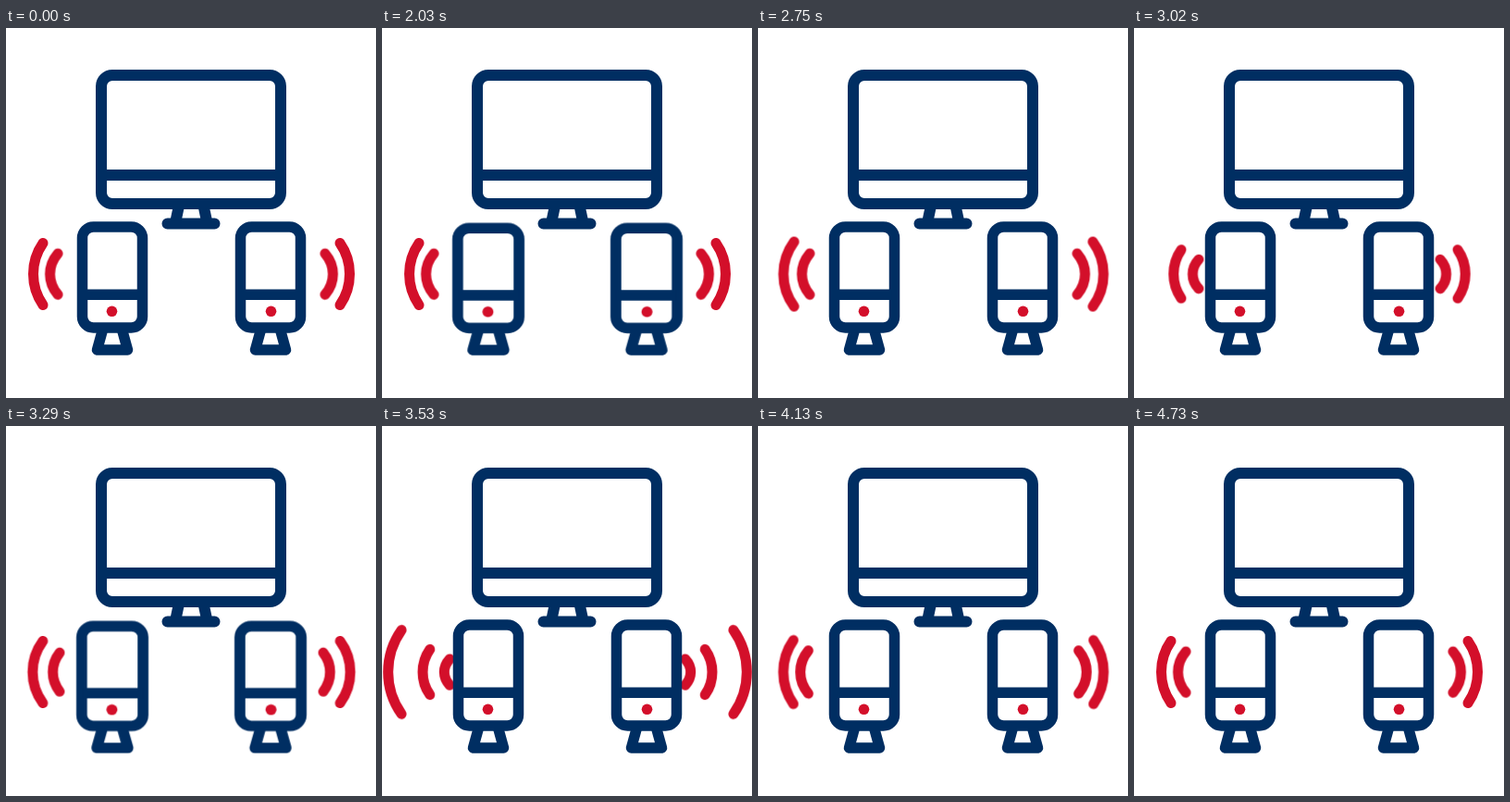
These frames come from a looping animation (400x400 px, 4.76 s). An HTML page without scripts:

```html
<!DOCTYPE html>
<html lang="en">
<head>
<meta charset="utf-8">
<title>Connected devices</title>
<style>
  html, body { margin: 0; width: 100%; height: 100%; overflow: hidden; background: #fff; }
  svg { display: block; width: 100%; height: 100%; }

  /* poses of one wave, from behind the phone to off stage */
  :root {
    --hidden: translateX(97px) scale(.1, .1);
    --born: translateX(70px) scale(.62, .465);
    --waiting: translateX(69.8px) scale(.62, .478);
    --near-inner: translateX(58px) scale(.7, .627);
    --inner: translateX(56px) scale(.81, .663);
    --leaving-inner: translateX(50px) scale(.71, .76);
    --between: translateX(52px) scale(.857, .806);
    --near-outer: translateX(39.8px) scale(1.05, 1);
    --outer: translateX(40px) scale(1, 1);
    --past-outer: translateX(39px) scale(1.1, 1.045);
    --edge: translateX(8px) scale(1.58, 1.58);
    --gone: translateX(-12px) scale(1.9, 1.9);
  }

  .line { fill: none; stroke: #002e62; stroke-width: 12; stroke-linecap: round; stroke-linejoin: round; }
  .phone { stroke-width: 11.5; }
  .body { fill: #fff; }
  .bar { stroke-linecap: butt; }
  .dot { fill: #d30f2a; stroke: none; }
  .wave {
    d: path("M0 -33.5A58.7 58.7 0 0 0 0 33.5");
    fill: none; stroke: #d30f2a; stroke-width: 11; stroke-linecap: round;
    vector-effect: non-scaling-stroke;
  }
  .wave, .phone { animation: 4760ms linear infinite; }
  .phone { transform-origin: 115px 354px; animation-name: squash; }
  .a { animation-name: a; }
  .b { animation-name: b; }
  .c { animation-name: c; }
  .d { animation-name: d; }
  .e { animation-name: e; }

  /* pulses start at 42.65%, 55.88% and 69.12% */
  @keyframes squash {
    0%, 42.6%, 44.2%, 54.6%, 57.2%, 67.9%, 70.4%, 100% { transform: none; }
    42.65%, 43.2%, 55.88%, 69.12% { transform: scale(1.02, .99); }
  }
  @keyframes a {
    0%, 42.65% { transform: var(--outer); }
    44.54% { transform: var(--past-outer); animation-timing-function: ease-in; }
    48.95% { transform: var(--edge); }
    49.58%, 100% { transform: var(--gone); }
  }
  @keyframes b {
    0%, 44.54% { transform: var(--inner); }
    48.95% { transform: var(--leaving-inner); }
    51.47% { transform: var(--between); }
    55.88% { transform: var(--near-outer); }
    57.77% { transform: var(--past-outer); animation-timing-function: ease-in; }
    62.18% { transform: var(--edge); }
    62.82%, 100% { transform: var(--gone); }
  }
  @keyframes c {
    0%, 44.54% { transform: var(--hidden); animation-timing-function: ease-out; }
    48.95% { transform: var(--born); }
    51.47% { transform: var(--waiting); }
    55.88% { transform: var(--near-inner); }
    57.77% { transform: var(--inner); }
    62.18% { transform: var(--leaving-inner); }
    64.71% { transform: var(--between); }
    69.12% { transform: var(--near-outer); }
    71.01% { transform: var(--past-outer); animation-timing-function: ease-in; }
    75.42% { transform: var(--edge); }
    76.05%, 100% { transform: var(--gone); }
  }
  @keyframes d {
    0%, 57.77% { transform: var(--hidden); animation-timing-function: ease-out; }
    62.18% { transform: var(--born); }
    64.71% { transform: var(--waiting); }
    69.12% { transform: var(--near-inner); }
    71.01% { transform: var(--inner); }
    75.42% { transform: var(--leaving-inner); }
    77.94% { transform: var(--between); animation-timing-function: ease-out; }
    84.24% { transform: translateX(35px) scale(1.1, 1.09); animation-timing-function: ease-in-out; }
    88.03% { transform: translateX(39.2px) scale(1.02, 1.01); animation-timing-function: ease-out; }
    92.4%, 100% { transform: var(--outer); }
  }
  @keyframes e {
    0%, 71.01% { transform: var(--hidden); animation-timing-function: ease-out; }
    75.42% { transform: var(--born); }
    77.94% { transform: var(--waiting); animation-timing-function: ease-out; }
    85.5% { transform: translateX(54px) scale(.83, .7); animation-timing-function: ease-in-out; }
    90% { transform: translateX(56.5px) scale(.8, .655); animation-timing-function: ease-out; }
    99.4%, 100% { transform: var(--inner); }
  }
</style>
</head>
<body>
<svg viewBox="0 0 400 400">
  <g class="line">
    <path d="M187 192L183 211M213.500 192L217.500 211M174.500 211.500H225.500"/>
    <rect class="body" x="103" y="51" width="194" height="139" rx="12"/>
    <path d="M103 159H297"/>
  </g>

  <!-- left device -->
  <g>
    <g transform="translate(0 266)">
      <path class="wave a"/>
      <path class="wave b"/>
      <path class="wave c"/>
      <path class="wave d"/>
      <path class="wave e"/>
    </g>
    <g class="line phone">
      <path d="M104 328L98.500 348H131.500L126 328"/>
      <rect class="body" x="82.500" y="215" width="65" height="109" rx="12"/>
      <path class="bar" d="M83 288.200H147"/>
      <circle class="dot" cx="114.500" cy="306.300" r="5.800"/>
    </g>
  </g>

  <!-- right device, mirrored -->
  <g transform="translate(401 0) scale(-1 1)">
    <g transform="translate(0 266)">
      <path class="wave a"/>
      <path class="wave b"/>
      <path class="wave c"/>
      <path class="wave d"/>
      <path class="wave e"/>
    </g>
    <g class="line phone">
      <path d="M104 328L98.500 348H131.500L126 328"/>
      <rect class="body" x="82.500" y="215" width="65" height="109" rx="12"/>
      <path class="bar" d="M83 288.200H147"/>
      <circle class="dot" cx="114.500" cy="306.300" r="5.800"/>
    </g>
  </g>
</svg>
</body>
</html>
```
